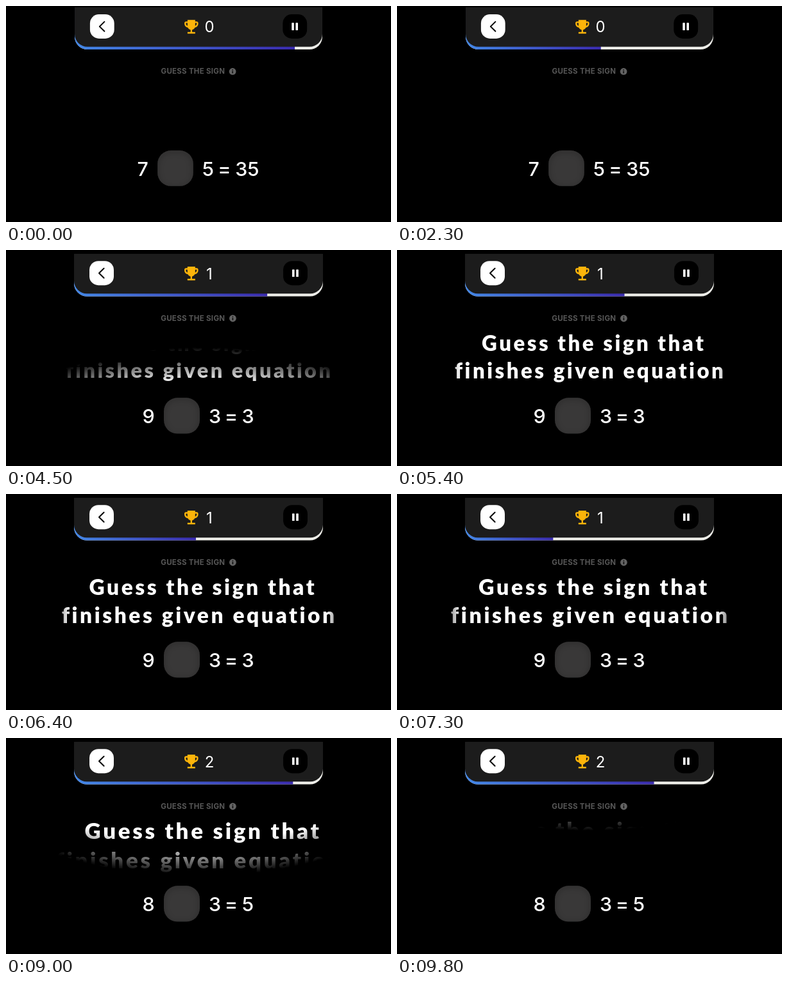
An HTML page with a canvas for the animation above (9900 ms loop, 600x338 px).

```html
<!DOCTYPE html>
<html lang="en">
<head>
<meta charset="utf-8">
<title>Guess the sign</title>
<style>
  html, body { margin: 0; width: 100%; height: 100%; overflow: hidden; background: #000; }
  canvas { display: block; width: 600px; height: 338px; }
</style>
</head>
<body>
<canvas id="stage" width="600" height="338"></canvas>
<script>
const stage = document.getElementById('stage');
const ctx = stage.getContext('2d');
const layer = document.createElement('canvas');
layer.width = 600;
layer.height = 338;
const caption = layer.getContext('2d');

const LOOP = 9900, STEP = 100;
const UI_FONT = 'Inter, Roboto, sans-serif';
const LEFT = 106, RIGHT = 494;
const trophy = new Path2D('M19 5h-2V3H7v2H5c-1.1 0-2 .9-2 2v1c0 2.55 1.92 4.63 4.39 4.94.63 1.5 1.98 2.63 3.61 2.96V19H7v2h10v-2h-4v-3.1c1.63-.33 2.98-1.46 3.61-2.96C19.08 12.63 21 10.55 21 8V7c0-1.1-.9-2-2-2zM5 8V7h2v3.82C5.84 10.4 5 9.3 5 8zm14 0c0 1.3-.84 2.4-2 2.82V7h2v1z');

// Each round: equation start, countdown start, speed in px/s, tile centre, [glyphs, centre x]
const rounds = [
  { from: 0, full: -0.747, speed: 57.8, tile: 263.8,
    parts: [['7', 212.7], ['5', 315], ['=', 340.7], ['35', 376.2]] },
  { from: 2.8, full: 3.015, speed: 58.5, tile: 274,
    parts: [['9', 222], ['3', 325.5], ['=', 351], ['3', 377]] },
  { from: 8, full: 8.2, speed: 58.4, tile: 274,
    parts: [['8', 222], ['3', 325.5], ['=', 351], ['5', 377]] }
];

function box(x, y, w, h, radii, fill) {
  ctx.beginPath();
  ctx.roundRect(x, y, w, h, radii);
  ctx.fillStyle = fill;
  ctx.fill();
}

function label(text, x, y, size, weight, color = '#fff', spacing = 0) {
  ctx.font = `${weight} ${size}px ${UI_FONT}`;
  ctx.letterSpacing = spacing + 'px';
  ctx.textAlign = 'center';
  ctx.fillStyle = color;
  ctx.fillText(text, x, y);
  ctx.letterSpacing = '0px';
}

function timerTip(t, index) {
  const { from, full, speed } = rounds[index];
  if (t >= full) return RIGHT - speed * (t - full);
  const last = rounds[index - 1];
  const start = RIGHT - last.speed * (from - last.full);
  return start + (RIGHT - start) * (t - from) / (full - from);
}

function drawHeader(tip, score) {
  const bottom = [0, 0, 20, 20];
  const width = RIGHT - LEFT;
  box(LEFT, 6, width, 66.4, bottom, '#ededE8');

  const shade = ctx.createLinearGradient(LEFT, 0, tip, 0);
  shade.addColorStop(0, '#4387e6');
  shade.addColorStop(1, '#3a2bae');
  ctx.save();
  ctx.beginPath();
  ctx.rect(LEFT - 1, 0, tip - LEFT + 1, 80);
  ctx.clip();
  box(LEFT, 6, width, 66.4, bottom, shade);
  ctx.restore();
  box(LEFT, 6, width, 62.2, bottom, '#1c1c1c');

  box(130, 17.2, 38, 38, 14, '#fff');
  ctx.beginPath();
  ctx.moveTo(152.6, 28.8);
  ctx.lineTo(145, 36.3);
  ctx.lineTo(152.6, 43.8);
  ctx.strokeStyle = '#000';
  ctx.lineWidth = 2;
  ctx.lineCap = ctx.lineJoin = 'round';
  ctx.stroke();

  box(432, 17.2, 38, 38, 14, '#000');
  box(446, 30.5, 3.6, 11.6, 0.6, '#fff');
  box(452.2, 30.5, 3.6, 11.6, 0.6, '#fff');

  ctx.save();
  ctx.translate(274.4, 22.3);
  ctx.scale(1.2, 1.2);
  ctx.fillStyle = '#fcb40a';
  ctx.fill(trophy);
  ctx.restore();
  label(String(score), 317, 45.6, 24, 400);
}

function drawTitle() {
  label('GUESS THE SIGN', 291.3, 111, 11.5, 700, '#575757', 0.3);
  ctx.beginPath();
  ctx.arc(353.4, 107, 5.4, 0, 7);
  ctx.fillStyle = '#626262';
  ctx.fill();
  box(352.7, 106.2, 1.4, 3.6, 0, '#000');
  box(352.7, 103.8, 1.4, 1.4, 0, '#000');
}

function drawTile(center) {
  ctx.save();
  box(center - 28, 231.3, 56, 56, 21, '#393838');
  ctx.clip();
  ctx.shadowColor = 'rgba(0,0,0,.55)';
  ctx.shadowBlur = 9;
  ctx.shadowOffsetY = 2;
  ctx.strokeStyle = '#333232';
  ctx.lineWidth = 2;
  ctx.beginPath();
  ctx.roundRect(center - 29, 230.3, 58, 58, 22);
  ctx.stroke();
  ctx.restore();
}

function keep(gradient, stops) {
  stops.forEach(([at, alpha]) => gradient.addColorStop(at, `rgba(0,0,0,${alpha})`));
  caption.fillStyle = gradient;
  caption.fillRect(0, 0, 600, 338);
}

// White caption, swept in and out by two soft rising arcs
function drawCaption(t) {
  const R = 720, FEATHER = 54;
  const top = 152 - 100 * (t - 4.5);
  const bottom = 217 - 90 * (t - 9);
  if (top > 215) return;

  const scale = 1 + 0.0158 * (t - 5.4);
  caption.globalCompositeOperation = 'source-over';
  caption.clearRect(0, 0, 600, 338);
  caption.save();
  caption.translate(300, 147);
  caption.scale(scale, scale);
  caption.font = '900 33px Lato, "Open Sans", sans-serif';
  caption.letterSpacing = '3.5px';
  caption.textAlign = 'center';
  caption.fillStyle = '#fff';
  caption.fillText('Guess the sign that', 6.7, 10.7);
  caption.fillText('finishes given equation', 1.2, 53.7);
  caption.restore();

  const fade = [[0, 1], [1 - FEATHER / R, 1], [1, 0]];
  const arc = (x, y) => caption.createRadialGradient(x, y, 0, x, y, R);
  caption.globalCompositeOperation = 'destination-in';
  keep(arc(306, top + R), fade);
  keep(arc(298, bottom - R), fade);
  keep(caption.createLinearGradient(63, 0, 535, 0), [[0, 0], [0.075, 1], [0.925, 1], [1, 0]]);
  ctx.drawImage(layer, 0, 0);
}

function draw(t) {
  const index = t < rounds[1].from ? 0 : t < rounds[2].from ? 1 : 2;
  const score = t < 3.1 ? 0 : t < 8.2 ? 1 : 2;
  const round = rounds[index];

  ctx.fillStyle = '#000';
  ctx.fillRect(0, 0, 600, 338);
  ctx.save();
  if (t < 4.1) {
    const k = 0.9948;
    ctx.transform(k, 0, 0, k, 300 * (1 - k), -4);
  }
  drawHeader(timerTip(t, index), score);
  drawTitle();
  drawTile(round.tile);
  round.parts.forEach(([text, x]) => label(text, x, 271.2, 30.5, 500));
  ctx.restore();
  drawCaption(t);
}

function tick() {
  const ms = performance.now() % LOOP;
  draw(Math.floor(ms / STEP) * STEP / 1000);
  requestAnimationFrame(tick);
}
tick();
</script>
</body>
</html>
```
